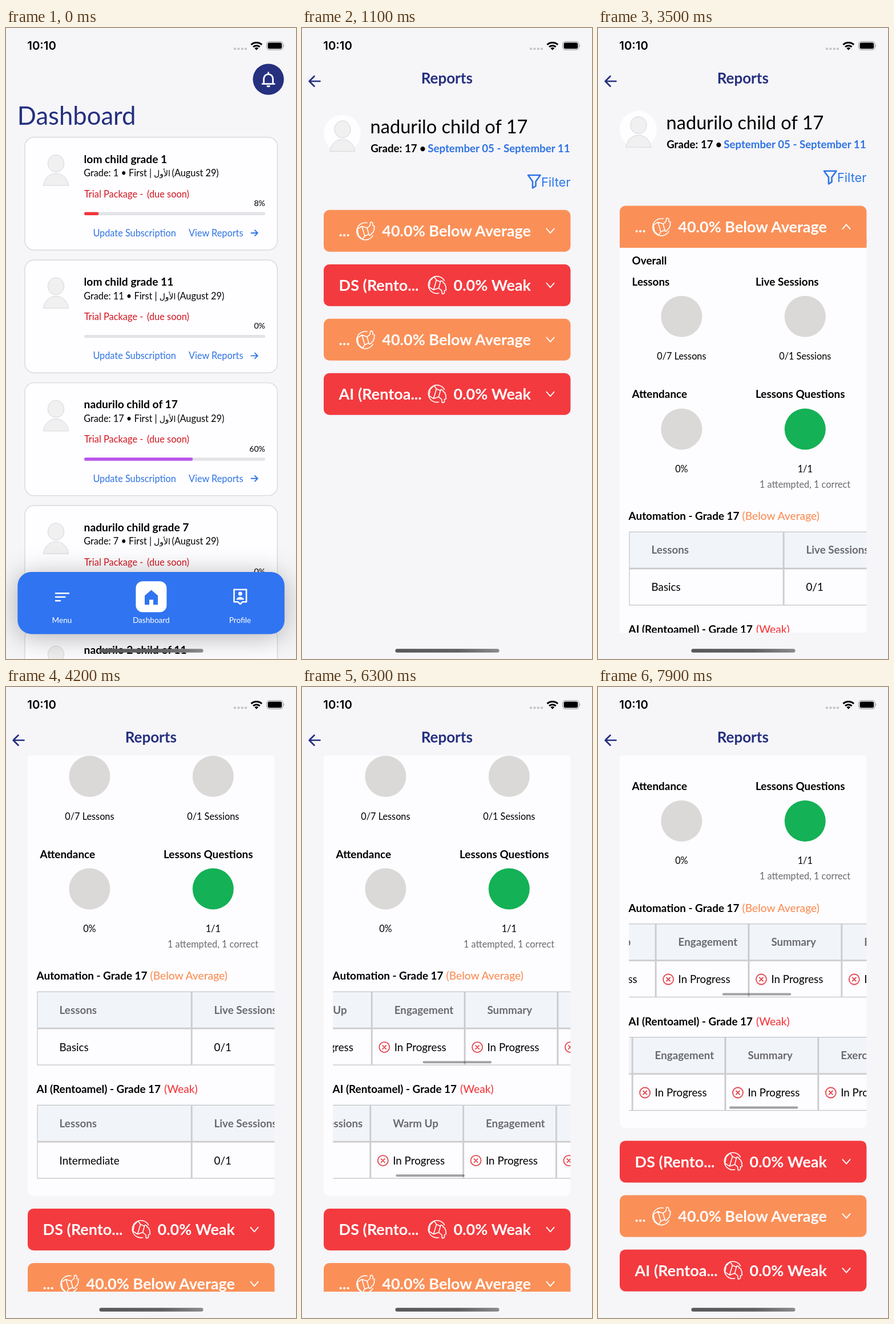
Recreate the animation shown at these times as an HTML page. Size 508 by 1102 pixels, loop 8 s.

```html
<!DOCTYPE html>
<html lang="en">
<head>
<meta charset="utf-8">
<title>Learning reports</title>
<style>
  html, body { margin: 0; width: 100%; height: 100%; overflow: hidden; background: #f6f5f8; }
  svg { display: block; width: 100%; height: 100%; font-family: Lato, "DejaVu Sans", sans-serif; }
  .nav { filter: drop-shadow(0 6px 24px rgba(0, 0, 0, .3)); }
  .line { fill: none; stroke-linecap: round; stroke-linejoin: round; }
</style>
</head>
<body>
<svg id="stage" viewBox="0 0 508 1102"></svg>
<script>
const NAVY = '#25307f', BLUE = '#2f74e4', ORANGE = '#fa9058', RED = '#f33a3f', PANEL = '#fdfcfe', GRAY = '#6b6a6f';

const text = (x, y, s, size, { fill = '#000', w = 400, a = 'start', more = '' } = {}) =>
  `<text x="${x}" y="${y}" font-size="${size}" font-weight="${w}" fill="${fill}" text-anchor="${a}" ${more}>${s}</text>`;
const box = (x, y, w, h, r, fill, more = '') =>
  `<rect x="${x}" y="${y}" width="${w}" height="${h}" rx="${r}" fill="${fill}" ${more}/>`;
const dot = (x, y, r, fill, more = '') => `<circle cx="${x}" cy="${y}" r="${r}" fill="${fill}" ${more}/>`;
const line = (d, color, w, more = '') => `<path class="line" d="${d}" stroke="${color}" stroke-width="${w}" ${more}/>`;
const group = (body, more) => `<g ${more}>${body}</g>`;
const at = (x, y) => `transform="translate(${x} ${y})"`;
const clip = (id, x, y, w, h) => `<clipPath id="${id}">${box(x, y, w, h, 0, '#000')}</clipPath>`;

// Head and shoulders, centred on the head
const avatar = (x, y) => group(
  `<ellipse rx="14.2" ry="15" fill="#f0f0f1" stroke="#d6d6d9"/>
   <path d="M-22 38.5C-20 26-12 17.5 0 17.5S20 26 22 38.5Z" fill="#f0f0f1" stroke="#d6d6d9"/>`, at(x, y));

/* ---------- dashboard ---------- */
function card(i, name, grade, pct, color) {
  const shift = grade > 9 ? 9.6 : 0;
  const bar = pct ? box(137, 321.5, 317 * pct / 100, 5.4, 2.7, color) : '';
  return group(
    box(33, 190.8, 442.4, 197, 16, '#fefdff', 'stroke="#d9d8dc" stroke-width="1.4"') +
    avatar(87.5, 236.5) +
    text(136.6, 235.6, name, 19.2, { w: 700 }) +
    text(136.2, 259.3, `Grade: ${grade} • First |`, 16.3) +
    text(273.5 + shift, 259.3, 'الأول', 14, { a: 'middle' }) +
    text(290.6 + shift, 259.3, '(August 29)', 16.3) +
    text(137, 295.5, 'Trial Package -', 16.4, { fill: '#d0161f' }) +
    text(247, 295.5, '(due soon)', 16.4, { fill: '#d0161f' }) +
    text(454, 311, pct + '%', 14.2, { a: 'end' }) +
    box(137, 321.5, 317, 5.4, 2.7, '#e3e2e6') + bar +
    text(152.4, 364, 'Update Subscription', 16.3, { fill: BLUE }) +
    text(320, 364, 'View Reports', 16.3, { fill: BLUE }) +
    line('M429.5 358h11M436 353.2l4.8 4.8-4.8 4.8', BLUE, 1.9), at(0, i * 214.4));
}

const bell = dot(459.6, 89.6, 27.2, NAVY) +
  line('M449 97.6h21.2M451.6 97.4v-8.6a8 8.2 0 0 1 16 0v8.6M459.6 77.8v2', '#fff', 2.8) +
  '<path d="M456.4 100.2h6.4a3.2 3.2 0 0 1-6.4 0Z" fill="#fff"/>';

const nav = group(box(20.3, 950, 467.6, 108.4, 24, '#3074f1'), 'class="nav"') +
  line('M87 987.3h23M87 993.8h16.5M87 1000.3h8', '#fff', 2.6) +
  box(227.4, 966.3, 54, 54, 12, '#fff') +
  '<path d="M254.5 981.5 266 991.2V1007.2H258V998.5H251V1007.2H243V991.2Z" fill="#3074f1"/>' +
  line('M399.5 980.7h21.6v21.6h-7l-3.8 3.8-3.8-3.8h-7Z', '#fff', 2.6) +
  dot(410.3, 988, 3.4, '#fff') + '<path d="M403.6 998.6c0-6.4 13.4-6.4 13.4 0Z" fill="#fff"/>' +
  [['Menu', 98], ['Dashboard', 254.3], ['Profile', 410]]
    .map(([s, x]) => text(x, 1039, s, 13.6, { fill: '#fff', a: 'middle' })).join('');

const dashboard = box(0, 0, 508, 1102, 0, '#f6f5f8') + bell +
  text(19.8, 168.5, 'Dashboard', 43.6, { fill: NAVY }) +
  card(0, 'lom child grade 1', 1, 8, '#f0363c') +
  card(1, 'lom child grade 11', 11, 0) +
  card(2, 'nadurilo child of 17', 17, 60, '#b955ec') +
  card(3, 'nadurilo child grade 7', 7, 0) +
  card(4, 'nadurilo 2 child of 11', 11, 0) + nav;

/* ---------- reports ---------- */
const thumb = (x, y, flip) => group(
  line('M3-14A15 15 0 1 0 13 8M-14-3-6-8 3-5M-6-8l5 17 7-3M-1 9l-4 6M-14-3l2 11 7 7', '#fff', 1.6) +
  line('M3-5 8-9l1-6q5-1 4 6 5 0 2 4 2 2-1 5 1 3-3 4 0 3-4 4L6 6Z', '#fff', 1.6),
  `transform="translate(${x} ${y}) scale(1 ${flip ? -1 : 1})"`);

// One accordion header; y is its top edge
function row(y, color, label, score, id = '') {
  const weak = color === RED;
  return group(
    box(38, 0, 432.4, 73, 10, color) +
    text(64.6, 46.3, label, 27, { fill: '#fff', w: 700 }) +
    thumb(weak ? 236.5 : 111, 36.5, weak) +
    text(401, 46.3, score, 27, { fill: '#fff', w: 700, a: 'end' }) +
    group(line('M-6.6-3.8 0 3.8 6.6-3.8', '#fff', 1.9, id), at(435, 36.5)), at(0, y));
}

const BAD = '40.0% Below Average', WEAK = '0.0% Weak';

function stat(x, y, title, value, fill) {
  const cx = x + 86.4;
  return text(x - .4, y, title, 18.9, { w: 700 }) + dot(cx, y + 54, 36, fill) +
    text(cx, y + 129.5, value, 16.3, { a: 'middle' });
}

const cell = (x, y, w, fill) => box(x + .7, y + .7, w - 1.4, 63.2, 0, fill, 'stroke="#c8c8ca" stroke-width="1.4"');

function table(n, y, lesson) {
  const names = ['Lessons', 'Live Sessions', 'Warm Up', 'Engagement', 'Summary', 'Exercises'];
  let x = 0, cols = '';
  names.forEach((name, i) => {
    const w = i ? 162.8 : 271;
    cols += cell(x, 0, w, '#f1f5f9') + cell(x, 64.6, w, PANEL) +
      text(x + 39.4, 39, name, 18.8, { fill: GRAY, w: 700 }) +
      text(x + 39.4, 104, [lesson, '0/1'][i] || 'In Progress', 18.8);
    if (i > 1) cols += dot(x + 22, 97.5, 9, 'none', 'stroke="#e5464e" stroke-width="1.8"') +
      line(`M${x + 19} 94.5l6 6m0-6l-6 6`, '#e5464e', 1.8);
    x += w;
  });
  return group(
    group(group(cols, `id="cols${n}"`) + box(0, 121.6, 120.5, 4, 2, 'rgba(0,0,0,.36)', `id="thumb${n}"`),
      'clip-path="url(#tableClip)"'), at(54.2, y));
}

const heading = (y, label, x, grade, color) =>
  text(53.6, y, label, 18.9, { w: 700 }) + text(x, y, grade, 19.2, { fill: color, w: 500 });

const panel = box(38, 380, 432.4, 864, 10, PANEL) + box(38, 375, 432.4, 16, 0, ORANGE) +
  text(59.6, 420, 'Overall', 18.9, { w: 700 }) +
  stat(60, 457, 'Lessons', '0/7 Lessons', '#dad9d7') +
  stat(276.4, 457, 'Live Sessions', '0/1 Sessions', '#dad9d7') +
  stat(60, 653.6, 'Attendance', '0%', '#dad9d7') +
  stat(276.4, 653.6, 'Lessons Questions', '1/1', '#14b156') +
  text(362.6, 810, '1 attempted, 1 correct', 16.3, { fill: GRAY, a: 'middle' }) +
  heading(866.3, 'Automation - Grade 17', 252.6, '(Below Average)', ORANGE) + table(1, 886.6, 'Basics') +
  heading(1064.3, 'AI (Rentoamel) - Grade 17', 277, '(Weak)', RED) + table(2, 1084.6, 'Intermediate');

const scroller =
  dot(70.5, 184.5, 32.6, '#fefdff') + avatar(71, 177) +
  text(119.6, 184, 'nadurilo child of 17', 32.6) +
  text(120.2, 216.8, 'Grade: 17 •', 18.7, { w: 700 }) +
  text(469.5, 216.8, 'September 05 - September 11', 18.7, { w: 700, fill: BLUE, a: 'end' }) +
  line('M396 257h21.5l-8 11v8l-5.5 3.5V268Z', BLUE, 2.6) +
  text(470.5, 276.5, 'Filter', 21.8, { fill: '#2b78ee', a: 'end', more: 'font-family="Inter, sans-serif"' }) +
  group(panel, 'id="panel"') + row(317.8, ORANGE, '...', BAD, 'id="chevron"') +
  group(row(412.8, RED, 'DS (Rento...', WEAK) + row(507.8, ORANGE, '...', BAD) +
    row(602.8, RED, 'AI (Rentoa...', WEAK), 'id="rest"');

const reports = box(0, 0, 508, 1102, 0, '#f6f5f8') +
  line('M13 93h18.5M21.5 84.2 12.7 93l8.8 8.8', NAVY, 2.7) +
  text(253.8, 97, 'Reports', 26, { fill: NAVY, w: 700, a: 'middle' }) +
  group(group(scroller, 'id="scroll"'), 'clip-path="url(#pageClip)"');

/* ---------- system chrome ---------- */
const chrome =
  text(37.3, 38.4, '10:10', 20.4, { w: 600, more: 'font-family="Inter, sans-serif"' }) +
  [401, 407.4, 413.8, 420].map(x => dot(x, 36.3, 2.1, '#c3c2c5')).join('') +
  '<path d="M429.5 29.2a13.5 13.5 0 0 1 18.6 0M433 33a8.4 8.4 0 0 1 11.6 0" fill="none" stroke="#000" stroke-width="3"/>' +
  '<path d="M435.4 35.3a5 5 0 0 1 6.8 0L438.8 38.8Z"/>' +
  box(456.6, 23.6, 28.6, 14.6, 4.6, 'none', 'stroke="#a3a2a5" stroke-width="1.2"') +
  box(458.6, 25.6, 24.6, 10.6, 2.8, '#000') +
  '<path d="M486.6 28.5q2.2 2.4 0 4.8Z" fill="#a3a2a5"/>' +
  box(163.5, 1084.2, 182, 6.6, 3.3, 'url(#homeFill)');

document.getElementById('stage').innerHTML =
  `<defs>${clip('pageClip', 0, 119.6, 508, 936.4)}${clip('tableClip', 0, -1, 416.2, 132)}
   <linearGradient id="homeFill"><stop stop-color="#58575a"/><stop offset=".6" stop-color="#605f62"/>
   <stop offset="1" stop-color="#8a898c"/></linearGradient></defs>` +
  group(dashboard, 'id="dash"') + box(0, 0, 508, 1102, 0, '#000', 'id="dim"') +
  group(reports, 'id="reports"') + chrome;

/* ---------- motion ---------- */
const LOOP = 8000, STEP = 100;
const $ = id => document.getElementById(id);
const flick = p => 1 - (1 - p ** 2.4) ** 3;
const push = p => 1 - (1 - p ** 1.5) ** 4;
const settle = p => 1 - (1 - p) ** 1.58;
const linear = p => p;

// Eased progress of a move; each step shows the state it ends in
const move = (t, from, to, ease = flick) =>
  t < from ? 0 : ease(Math.min(1, (t + STEP - from) / (to - from)));
const shift = (id, x, y) => $(id).setAttribute('transform', `translate(${x} ${y})`);
const show = (id, on) => $(id).setAttribute('display', on ? 'inline' : 'none');

function slideTable(n, x, visible) {
  shift('cols' + n, -x, 0);
  shift('thumb' + n, 1.5 + x * .295, 0);
  show('thumb' + n, visible);
}

function draw(t) {
  const p = move(t, 500, 1200, push), open = t >= 2300;
  shift('dash', -152 * p, 0);
  shift('reports', 508 * (1 - p), 0);
  $('dim').setAttribute('opacity', .1 * p);
  show('dash', p < 1);

  show('panel', open);
  shift('rest', 0, open ? 853.2 : 0);
  $('chevron').setAttribute('transform', open ? 'scale(1 -1)' : '');

  const nudge = t >= 6700 ? 1 : 0;
  shift('scroll', 0, -(355 * move(t, 3500, 4300) + nudge + 117.6 * move(t, 7700, 8000)));
  slideTable(1, 462 * move(t, 4900, 5800) + 87.6 * move(t, 5800, 6700), t >= 4900);
  slideTable(2, 447 * move(t, 5800, 6700, settle) + 143.6 * move(t, 6700, 7300, linear), t >= 5800);
}

const start = performance.now();
function tick() {
  const t = (performance.now() - start) % LOOP;
  draw(Math.floor(t / STEP) * STEP);
  requestAnimationFrame(tick);
}
tick();
</script>
</body>
</html>
```
